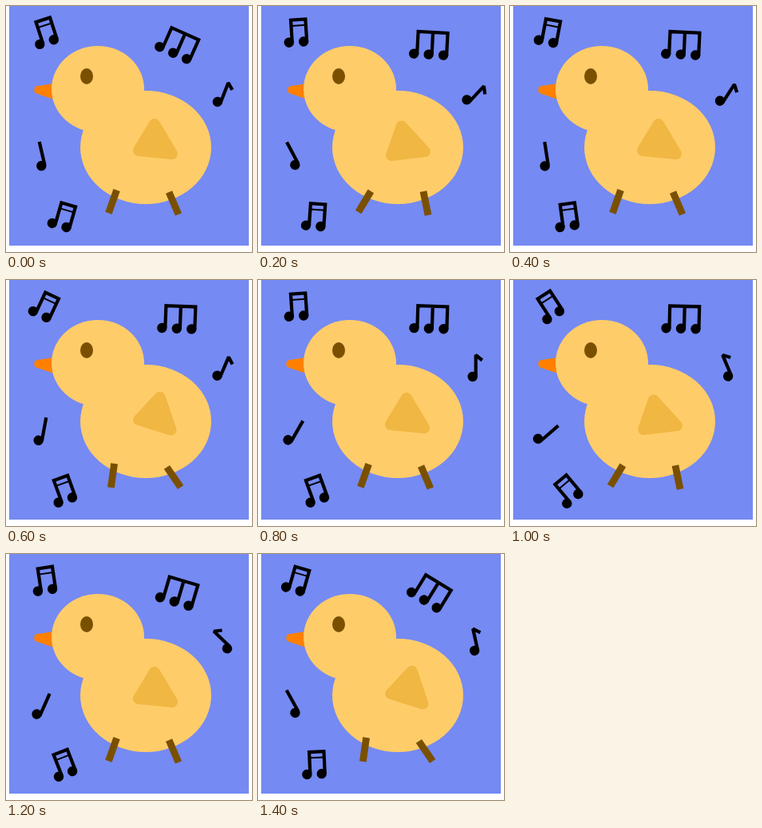
An HTML page that plays this animation: 308x308 px, repeating every 1.6 s.

```html
<!DOCTYPE html>
<html lang="en">
<head>
<meta charset="utf-8">
<title>Singing chick</title>
<style>
html, body { margin: 0; height: 100%; overflow: hidden; background: #fff; }
svg { display: block; width: 100vw; height: 100vh; }
.note path { fill: none; stroke: #000; stroke-width: 4.2; }
.note .thin { stroke-width: 2; }
.leg { stroke: #7a5000; stroke-width: 8.8; }
</style>
</head>
<body>
<svg viewBox="0 0 308 308">
  <defs>
    <circle id="head" r="6.2"/>
    <g id="pair" class="note">
      <use href="#head" x="-11.2" y="12.2"/><use href="#head" x="7.2" y="12.2"/>
      <path d="M-7.2 12V-15.6H11.2V12"/>
      <path class="thin" d="M-7 -8.3H11"/>
    </g>
    <g id="triple" class="note">
      <use href="#head" x="-21" y="13"/><use href="#head" x="-2.5" y="13"/><use href="#head" x="16" y="13"/>
      <path d="M-17 13V-15H20V13M1.5 13V-15"/>
    </g>
    <g id="quarter" class="note">
      <use href="#head" x="1.5" y="9"/>
      <path d="M5.8 9V-21"/>
    </g>
    <g id="eighth" class="note">
      <use href="#head" x="-1" y="11"/>
      <path d="M3 11V-16L11 -9.5" stroke-linejoin="bevel"/>
    </g>
  </defs>
  <rect x="4" width="300" height="300" fill="#758af2"/>
  <path id="beak" d="M60 97L37 100.5Q34 105 36.5 109L60 117Z" fill="#ff8000"/>
  <g fill="#ffcc6a">
    <ellipse cx="175" cy="177" rx="82" ry="71"/>
    <ellipse cx="115" cy="104" rx="58" ry="54"/>
  </g>
  <ellipse cx="101" cy="88" rx="8" ry="10" fill="#7a5000"/>
  <path id="wing" d="M186 148L166 181L208 185Z" fill="#f0b742" stroke="#f0b742" stroke-width="14" stroke-linejoin="round"/>
  <path id="left" class="leg" d="M0 -15.2V15.2"/>
  <path id="right" class="leg" d="M0 -15.2V15.2"/>
  <g id="notes"></g>
</svg>
<script>
const STEP = 200, STEPS = 8;
const $ = id => document.getElementById(id);

const place = (el, x, y, angle) =>
  el.setAttribute("transform", `translate(${x} ${y}) rotate(${angle})`);

// Linear tilt between [step, degrees] keys, wrapping to the first key
function tiltAt(keys, step) {
  const path = [...keys, [STEPS, keys[0][1]]];
  const i = path.findIndex(([s]) => s > step);
  const [s0, a0] = path[i - 1], [s1, a1] = path[i];
  return a0 + (a1 - a0) * (step - s0) / (s1 - s0);
}

function addNote(shape, x, y, ...keys) {
  const el = document.createElementNS("http://www.w3.org/2000/svg", "use");
  el.setAttribute("href", "#" + shape);
  $("notes").append(el);
  return step => place(el, x, y, tiltAt(keys, step));
}

const notes = [
  addNote("pair", 49.2, 32.8, [0, -18], [3, 25], [5, -33], [7, 16]),
  addNote("triple", 216.8, 47.8, [0, 24], [1, 3], [5, 1.5], [7, 31.5]),
  addNote("eighth", 269.7, 110, [0, 21], [1, 43], [3, 23], [6, -46]),
  addNote("quarter", 40.8, 191.7, [0, -13], [1, -28], [5, 49], [6, 24], [7, -29]),
  addNote("pair", 72, 263.3, [0, 16], [3, -20], [4, -20], [5, -40])
];

function draw(step) {
  const swing = -Math.round(Math.sin(step * Math.PI / 2));
  notes.forEach(turn => turn(step));
  $("wing").setAttribute("transform", `rotate(${12 * swing} 195 179)`);
  place($("left"), 133.5, 244.9, 19.5 - 11.5 * swing);
  place($("right"), 210, 246.9, -23 - 11.5 * swing);
  place($("beak"), step === 1 ? 2 : 0, 0, 0);
}

let last = -1;
function tick() {
  const step = Math.floor(performance.now() / STEP) % STEPS;
  if (step !== last) draw(last = step);
  requestAnimationFrame(tick);
}
tick();
</script>
</body>
</html>
```
